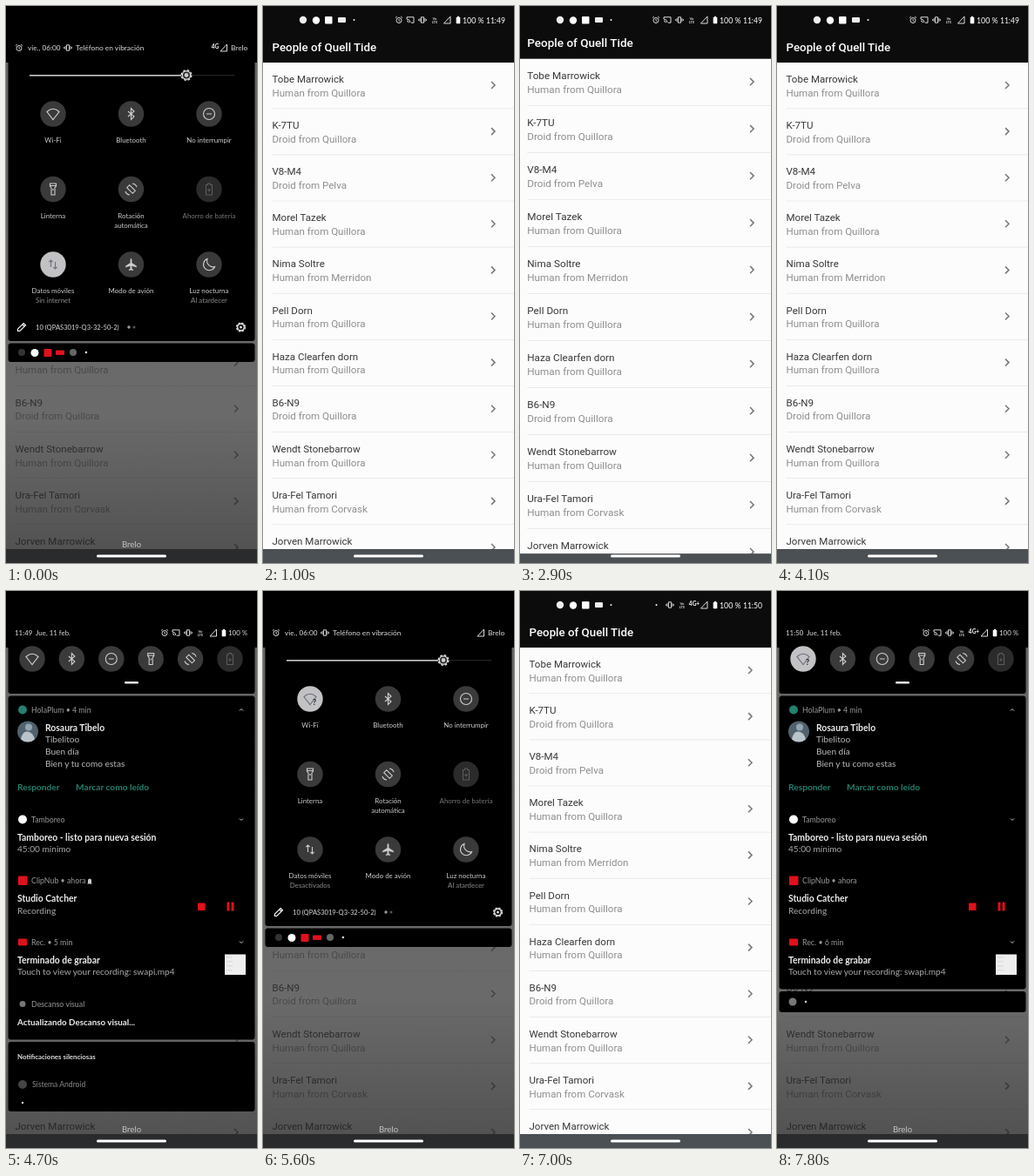
An HTML page for the animation above (7.9 s loop, 288x640 px).

```html
<!DOCTYPE html>
<html lang="es">
<head>
<meta charset="utf-8">
<title>Phone screen</title>
<style>
html, body { margin: 0; width: 100%; height: 100%; overflow: hidden; background: #000; }
svg { display: block; }
text { font-family: Lato, "Open Sans", sans-serif; white-space: pre; }
.app text { font-family: Roboto, Arial, sans-serif; }
</style>
</head>
<body>
<svg width="288" height="640" viewBox="0 0 288 640">
  <defs>
    <linearGradient id="scrim" x1="0" y1="0" x2="0" y2="1">
      <stop offset="0" stop-color="#2c2c2c" stop-opacity=".72"/>
      <stop offset=".7" stop-color="#2c2c2c" stop-opacity=".7"/>
      <stop offset=".97" stop-color="#202020" stop-opacity=".77"/>
    </linearGradient>
  </defs>
  <g id="stage"></g>
</svg>
<script>
const LOOP = 7900, STEP = 100;
const stage = document.getElementById('stage');
const TEAL = '#23806f', RED = '#e0101c';

const people = [
  ['Tobe Marrowick', 'Human from Quillora'],
  ['K-7TU', 'Droid from Quillora'],
  ['V8-M4', 'Droid from Pelva'],
  ['Morel Tazek', 'Human from Quillora'],
  ['Nima Soltre', 'Human from Merridon'],
  ['Pell Dorn', 'Human from Quillora'],
  ['Haza Clearfen dorn', 'Human from Quillora'],
  ['B6-N9', 'Droid from Quillora'],
  ['Wendt Stonebarrow', 'Human from Quillora'],
  ['Ura-Fel Tamori', 'Human from Corvask'],
  ['Jorven Marrowick', 'Human from Quillora']
];

const icons = {
  wifi: 'M-7-2.5Q0-9 7-2.5L0 6.5Z',
  bluetooth: 'M-3.5-3L3.5 3 0 6.5V-6.5L3.5-3-3.5 3',
  dnd: 'M-6.5 0a6.5 6.5 0 1 1 13 0a6.5 6.5 0 1 1-13 0M-3 0H3',
  torch: 'M-3.5-6.5h7v3l-1.5 2V6.5h-4V-1.5l-1.5-2zM-3.5-4h7M0-.5v2',
  rotate: 'M-1.8-4.8L4.8 1.8 1.8 4.8-4.8-1.8ZM1.5-6.5Q5.5-6 6.5-2.5M-1.5 6.5Q-5.5 6-6.5 2.5',
  saver: 'M-3.5-5h2v-1.5h3V-5h2V6.5h-7zM-1.8 1h3.6M0-.8v3.6',
  data: 'M-2.5 3V-5M-4.7-2.8L-2.5-5-.3-2.8M2.5-3V5M.3 2.8L2.5 5 4.7 2.8',
  plane: 'M0-6.8Q.7-6.8.7-5V-1.8L6.2 1.8V3L.7 1.6V4.8L2.4 6V6.8L0 6.2-2.4 6.8V6L-.7 4.8V1.6L-6.2 3V1.8L-.7-1.8V-5Q-.7-6.8 0-6.8Z',
  moon: 'M-2-6.5A6.8 6.8 0 1 0 6.6 2.5A7 7 0 0 1-2-6.5Z',
  alarm: 'M-3 .5a3 3 0 1 1 6 0a3 3 0 1 1-6 0M0-1V.7L1.2 1.5M-4-2.4L-2.2-4M4-2.4L2.2-4',
  cast: 'M-4-1V-3.2H4V3.2H1M-4 1Q-2 1-2 3.2M-4-1Q0-.6 0 3.2',
  vibrate: 'M-1.6-3.2h3.2v6.4h-3.2zM-3-1.8v3.6M3-1.8v3.6M-4.4-.8v1.6M4.4-.8v1.6',
  signal: 'M3.5-4V4H-4Z',
  pencil: 'M-4.5 4.5V2.2L2.2-4.5 4.5-2.2-2.2 4.5ZM.8-3L3 -.8',
  down: 'M-2-1L0 1 2-1',
  up: 'M-2 1L0-1 2 1',
  next: 'M-2-4L2 0-2 4'
};

const tiles = [
  ['wifi', 'Wi-Fi'], ['bluetooth', 'Bluetooth'], ['dnd', 'No interrumpir'],
  ['torch', 'Linterna'], ['rotate', 'Rotación', 'automática'], ['saver', 'Ahorro de batería'],
  ['data', 'Datos móviles'], ['plane', 'Modo de avión'], ['moon', 'Luz nocturna', 'Al atardecer']
];

const mix = (a, b, k) => a + (b - a) * k;
const ramp = (t, a, b) => {
  const k = Math.min(1, Math.max(0, (t - a) / (b - a)));
  return k * k * (3 - 2 * k);
};

const rect = (x, y, w, h, fill, r = 0) =>
  `<rect x="${x}" y="${y}" width="${w}" height="${h}" rx="${r}" fill="${fill}"/>`;
const panel = (y, h) => rect(2.5, y, 283, h, '#000', 3);
const dot = (x, y, r, fill) => `<circle cx="${x}" cy="${y}" r="${r}" fill="${fill}"/>`;
const ring = (x, y, r, width, dash) =>
  `<circle cx="${x}" cy="${y}" r="${r}" fill="none" stroke="#ddd" stroke-width="${width}" stroke-dasharray="${dash}"/>`;
const text = (x, y, s, size, fill = '#ddd', weight = 400, anchor = 'start') =>
  `<text x="${x}" y="${y}" font-size="${size}" fill="${fill}" font-weight="${weight}" text-anchor="${anchor}">${s}</text>`;
const icon = (name, x, y, color = '#ddd', width = 1, fill = 'none') =>
  `<path transform="translate(${x} ${y})" d="${icons[name]}" fill="${fill}" stroke="${color}" stroke-width="${width}"/>`;
const group = (body, opacity = 1, move = '') =>
  opacity <= 0 ? '' : `<g opacity="${opacity}" transform="${move}">${body}</g>`;

function app(zoom) {
  let s = rect(-10, -20, 308, 680, '#fcfcfc') + rect(-10, -20, 308, 85, '#0c0c0c') +
    text(10.5, 51.5, 'People of Quell Tide', 13.3, '#fff', 500);
  people.forEach(([name, origin], i) => {
    const y = 65 + i * 53.1;
    s += text(10.5, y + 23, name, 11.55, '#383838') +
      text(10.5, y + 38.7, origin, 11.55, '#8e8e8e') +
      icon('next', 264, y + 26, '#777', 1.5) +
      rect(10.5, y + 52.4, 290, .8, '#e6e6e6');
  });
  s += rect(-10, 624, 308, 40, '#4b5054');
  return `<g class="app" transform="translate(144 320) scale(${zoom}) translate(-144 -320)">${s}</g>`;
}

const battery = (x, y) => rect(x - 2.3, y - 3.2, 4.6, 7.4, '#fff', .6) + rect(x - 1, y - 4.2, 2, 1.4, '#fff');
const volte = (x, y) => text(x, y - .3, 'Vo', 4.2, '#ddd', 700, 'middle') + text(x, y + 3.6, 'LTE', 4, '#ddd', 700, 'middle');
const network = (x, y, s = '4G+') => text(x, y, s, 6.5, '#fff', 700, 'middle');

function statusBar(late) {
  let s = dot(46, 16, 4.2, '#eee') + dot(61, 16.5, 4.2, '#fff') + rect(71, 12, 8.5, 8.5, '#fff', 1) +
    rect(86, 13, 9, 6, '#eee', 1) + dot(104.5, 16, 1, '#fff');
  s += late
    ? dot(156.5, 16, 1, '#fff') + icon('vibrate', 172, 16) + volte(186, 16) + network(200, 16.5)
    : icon('alarm', 156, 16) + icon('cast', 169, 16) + icon('vibrate', 183, 16) + volte(197, 16);
  return s + icon('signal', 211.5, 16) + battery(224, 16) + text(229, 19.5, '100 %', 8.8, '#fff') +
    text(278, 19.5, late ? '11:50' : '11:49', 8.6, '#fff', 400, 'end');
}

function shadeStatus(late, dataOn, p) {
  const shift = late ? -11 : 0;
  const brief = text(10, 51, `${late ? '11:50' : '11:49'}  Jue, 11 feb.`, 7.9) +
    icon('alarm', 182 + shift, 48) + icon('cast', 195 + shift, 48) + icon('vibrate', 209 + shift, 48) +
    volte(223 + shift, 48) + (late ? network(226, 48.5) : '') + icon('signal', 238, 48) +
    battery(250, 48) + text(255, 51, '100 %', 7.9);
  const full = icon('alarm', 15, 48) + text(25, 51, 'vie., 06:00', 8.2) + icon('vibrate', 71, 48) +
    text(80, 51, 'Teléfono en vibración', 8.4) + (dataOn ? network(240, 48.5, '4G') : '') +
    icon('signal', 250, 48) + text(258, 51, 'Brelo', 8.4);
  return group(brief, 1 - 2 * p) + group(full, 2 * p - 1);
}

function quickTiles(wifiOn, dataOn, p) {
  return tiles.map(([name, label, extra], i) => {
    const gx = 54 + i % 3 * 89.5, gy = 124 + Math.floor(i / 3) * 86.5;
    const x = i < 6 ? mix(30 + i * 45.4, gx, p) : gx;
    const y = i < 6 ? mix(78, gy, p) : gy;
    const on = name === 'wifi' && wifiOn || name === 'data' && dataOn;
    const dim = name === 'saver';
    const color = on ? '#6c707c' : dim ? '#5c5c5c' : '#d0d0d0';
    const filled = name === 'plane' ? color : 'none';
    let s = dot(x, y, 14.7, on ? '#c2c2c5' : dim ? '#2b2b2c' : '#3a3a3b') +
      icon(name, x, y, color, name === 'plane' ? .4 : 1.1, filled);
    if (name === 'wifi' && on) s += text(x + 5, y + 7, '?', 9, '#222', 700, 'middle');
    const sub = name === 'data' ? (dataOn ? 'Sin internet' : 'Desactivados') : extra;
    const subColor = name === 'rotate' ? '#ccc' : '#8c8c8c';
    const labels = text(gx, gy + 33, label, 7.9, dim ? '#777' : '#ccc', 400, 'middle') +
      (sub ? text(gx, gy + 44, sub, 7.9, subColor, 400, 'middle') : '');
    return group(s, i < 6 ? 1 : 2 * p - 1) + group(labels, 2 * p - 1);
  }).join('');
}

function quickSettings(wifiOn, dataOn, p, bottom) {
  const full = rect(27, 79, 174, 1.6, '#c8c8c8') + rect(213, 79.4, 49, .8, '#383838') +
    dot(207, 79.5, 6, '#222') + ring(207, 79.5, 5.8, 1.4, '2.6 1.95') + ring(207, 79.5, 4.6, 1.2, 'none') +
    dot(207, 79.5, 2.4, '#ccc') +
    icon('pencil', 18, 369, '#fff', 1.2) + text(34, 372, '10 (QPAS3019-Q3-32-50-2)', 7.6) +
    dot(141, 369, 1.7, '#999') + dot(147, 369, 1.5, '#555') +
    ring(269.5, 369, 4.9, 1.4, '2.6 1.25') + ring(269.5, 369, 3.8, 1.4, 'none') + dot(269.5, 369, 1.5, '#ddd');
  return rect(0, 0, 288, 65, '#000') + panel(0, bottom) +
    group(rect(136, 104, 16, 2.5, '#eee', 1.2), 1 - 2 * p) +
    group(full, 2 * p - 1) + quickTiles(wifiOn, dataOn, p);
}

const heading = (y, label, arrow) =>
  text(26, y + 3, label, 8.8, '#999') + (arrow ? icon(arrow, 267, y, '#ccc') : '');

// Coordinates are relative to the card's top-left corner.
function notifications(late) {
  let s = dot(16, 16, 5, TEAL) + heading(16, 'HolaPlum • 4 min', 'up') +
    dot(22, 41, 12, '#51616d') +
    `<path d="M14 50Q16 40 22 41T30 50A12 12 0 0 1 14 50Z" fill="#b9c3ca"/>` + dot(23, 36, 4, '#91a4b1') +
    text(42, 40, 'Rosaura Tibelo', 10.4, '#eee', 700) + text(42, 53.5, 'Tibelitoo', 10.1, '#bbb') +
    text(42, 67.5, 'Buen día', 10.1, '#bbb') + text(42, 81.5, 'Bien y tu como estas', 10.1, '#bbb') +
    text(10, 108, 'Responder', 10.2, TEAL, 700) + text(77, 108, 'Marcar como leído', 10.2, TEAL, 700);

  s += dot(16, 142, 5, '#fff') + heading(142, 'Tamboreo', 'down') +
    text(10, 166, 'Tamboreo - listo para nueva sesión', 10.4, '#eee', 700) +
    text(10, 179.5, '45:00 mínimo', 10.1, '#aaa');

  s += rect(11, 207, 10.5, 10.5, RED, 1) + heading(212.5, 'ClipNub • ahora') +
    (late ? '' : `<path d="M91 215V212a2 2 0 0 1 4 0v3l1 1h-6z" fill="#ccc"/>`) +
    text(10, 236.5, 'Studio Catcher', 10.4, '#eee', 700) + text(10, 250, 'Recording', 10.1, '#aaa') +
    rect(217, 238, 8.5, 8.5, RED) + rect(250.5, 237, 3, 10, RED) + rect(255.5, 237, 3, 10, RED);

  s += rect(11, 279, 10, 8, RED, 1) + heading(283, `Rec. • ${late ? 6 : 5} min`, 'down') +
    text(10, 307.5, 'Terminado de grabar', 10.4, '#eee', 700) +
    text(10, 320.5, 'Touch to view your recording: swapi.mp4', 10.1, '#aaa') +
    rect(248, 297, 24, 23.5, '#eee');
  for (let i = 0; i < 4; i++) s += rect(250, 300 + i * 5, 7, .7, '#ccc');

  if (!late) s += dot(16, 354, 3.5, '#777') + heading(354, 'Descanso visual') +
    text(10, 378.5, 'Actualizando Descanso visual...', 9.8, '#eee', 700);
  return s;
}

function silent(late) {
  return late
    ? panel(0, 24) + dot(18, 12, 4.5, '#777') + dot(33, 12, 1.2, '#ddd')
    : panel(0, 80) + text(13, 19.5, 'Notificaciones silenciosas', 7.9, '#ddd', 700) +
      dot(19, 49, 5, '#444') + text(30, 52, 'Sistema Android', 8.6, '#888') + dot(19, 70, 1.2, '#ddd');
}

function shade(late, wifiOn, dataOn, p) {
  const bottom = mix(118, 385, p), top = bottom + 2.5;
  const height = mix(late ? 337 : 395, 21.5, p);
  const strip = dot(15, 10.5, 4, '#333') + dot(30, 11, 4.5, '#fff') + rect(40.5, 6.5, 9, 9, RED, 1) +
    rect(54, 8, 10, 5.5, RED, 1) + dot(74, 10.5, 4, '#666') + dot(89, 10.5, 1.2, '#fff');
  return group(silent(late), 1 - p, `translate(0 ${top + height + 2.5})`) +
    panel(top, height) +
    `<svg x="3" y="${top}" width="282" height="${height}">` +
    group(notifications(late), 1 - 2 * p) + group(strip, 2 * p - 1) + '</svg>' +
    quickSettings(wifiOn, dataOn, p, bottom) + shadeStatus(late, dataOn, p);
}

function scene(t) {
  const open = 1 - ramp(t, 500, 900) + ramp(t, 4100, 4600) - ramp(t, 6450, 6850) + ramp(t, 7250, 7750);
  const expand = t < 1000 ? 1 : t < 7000 ? ramp(t, 4800, 5300) : 0;
  const zoom = 1 + .017 * (ramp(t, 1700, 2100) - ramp(t, 3400, 3800));
  const late = t >= 6000, wifiOn = t >= 5400, dataOn = t < 300 || late;
  return app(zoom) +
    group(rect(0, 65, 288, 575, 'url(#scrim)'), open) +
    group(statusBar(late), 1 - 3 * open) +
    (open > 0 ? group(shade(late, wifiOn, dataOn, expand), 1, `translate(0 ${(open - 1) * 600})`) : '') +
    group(text(144, 621.5, 'Brelo', 9.6, '#c4c4c4', 400, 'middle'), open) +
    rect(104, 630.5, 80, 3, '#fff', 1.5);
}

let shown = -1;
const start = performance.now();
function tick() {
  const t = Math.floor((performance.now() - start) % LOOP / STEP) * STEP;
  if (t !== shown) stage.innerHTML = scene(shown = t);
  requestAnimationFrame(tick);
}
tick();
</script>
</body>
</html>
```
